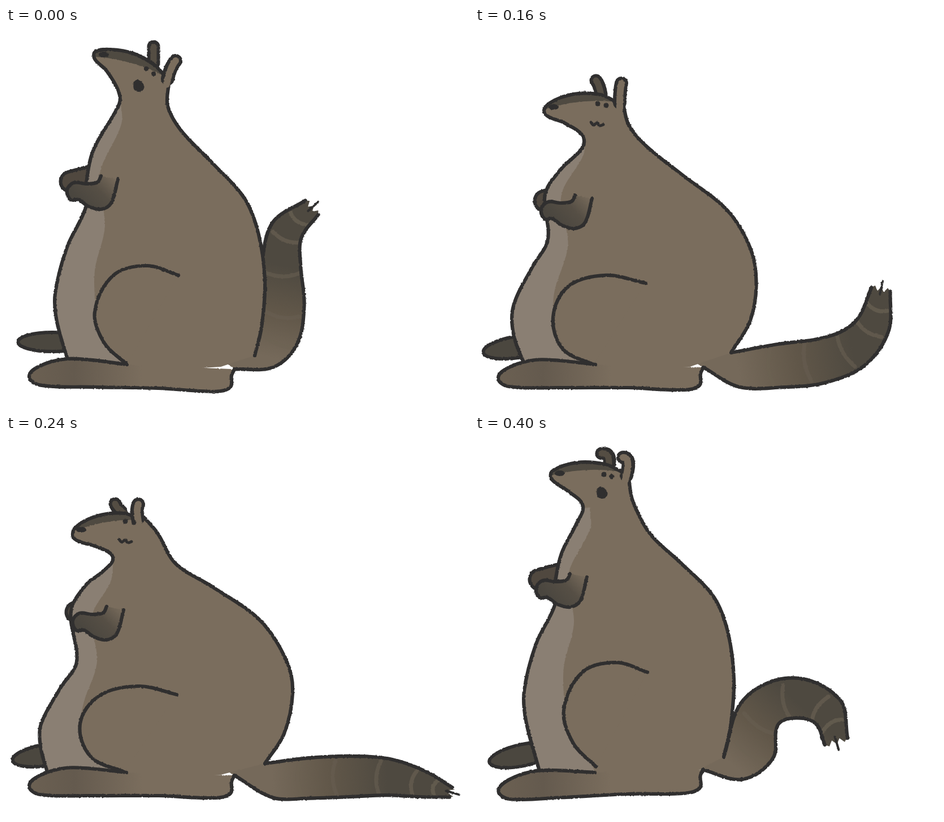
An HTML page for the animation above (0.48 s loop, 819 px wide and 673 px high).

```html
<!DOCTYPE html>
<html lang="en">
<head>
<meta charset="utf-8">
<title>Bouncing animal</title>
<style>
html, body { margin: 0; width: 100%; height: 100%; overflow: hidden; background: #fff; }
svg { display: block; width: 100vw; height: 100vh; }
path { stroke-linecap: round; stroke-linejoin: round; }
.ink { fill: none; stroke: #302f2f; stroke-width: 6.2; }
.stripe { fill: none; stroke: #6a6153; stroke-width: 7; }
.dark { fill: #302f2f; }
</style>
</head>
<body>
<svg id="stage" viewBox="0 0 819 673">
  <defs>
    <filter id="rough" filterUnits="userSpaceOnUse" x="0" y="0" width="819" height="673" color-interpolation-filters="sRGB">
      <feTurbulence type="fractalNoise" baseFrequency=".3" numOctaves="1" seed="4"/>
      <feDisplacementMap in="SourceGraphic" scale="3" xChannelSelector="R" yChannelSelector="G"/>
    </filter>
    <linearGradient id="arm" x1=".15" y1=".6" x2="1" y2=".05">
      <stop offset="0" stop-color="#4a463f"/><stop offset=".5" stop-color="#564f45"/><stop offset="1" stop-color="#7a6d5d"/>
    </linearGradient>
    <linearGradient id="foot">
      <stop offset="0" stop-color="#6b6052"/><stop offset=".22" stop-color="#645a4e"/><stop offset=".55" stop-color="#7a6d5d"/>
    </linearGradient>
  </defs>
</svg>
<script>
const FUR = '#7a6d5d', BELLY = '#8a7f73', SHADE = '#4b473f', INK = '#302f2f';
const STEP = 80;

const pts = s => s.split(' ').map(p => p.split(',').map(Number));
const mix = (a, b, t) => a.map((v, i) => v + (b[i] - v) * t);
const move = ([x, y], [nx, ny], d) => [x + nx * d, y + ny * d];
const unit = (a, b) => {
  const x = b[0] - a[0], y = b[1] - a[1], len = Math.hypot(x, y) || 1;
  return [x / len, y / len];
};

// Torso lines when tall, half squashed and fully squashed
const torso = {
  front: [
    '142,275 141,318 108,388 87,470 90,520 113,600',
    '134,280 134,345 105,402 76,475 78,535 106,602',
    '115,310 125,400 97,445 62,510 61,550 76,605'
  ].map(pts),
  back: [
    '310,182 365,239 422,302 447,366 458,450 452,530 440,580',
    '305,190 365,249 440,317 474,383 483,455 476,515 447,572',
    '300,226 365,267 450,327 497,400 507,455 492,527 458,580'
  ].map(pts),
  thigh: [
    '305,438 250,421 190,438 157,503 174,558 214,596',
    '302,445 233,431 170,452 147,512 163,567 211,597',
    '302,458 235,443 165,460 131,510 150,568 209,595'
  ].map(pts),
  patch: [
    '203,130 204,170 165,262 175,350 157,430 158,500',
    '195,155 201,185 155,275 169,365 145,460 148,515',
    '190,222 185,258 152,320 161,400 138,470 130,510'
  ].map(pts)
};
const armShape = pts('0,0 -6,11 -25,14 -48,12 -60,25 -54,42 -40,42 -22,54 0,59 18,48 30,6');
const footShape = pts('213,596 150,589 105,588 60,601 41,620 60,635 150,637 270,637 370,641 397,633 399,612 404,601');
const mouths = {
  open: { shape: pts('-6,-5 -1,-8 8,1 4,8 -5,6 -6,-5'), width: 5, fill: INK },
  dash: { shape: pts('-8,-1 0,1 8,1'), width: 10.5, fill: 'none' },
  curl: { shape: pts('-11,-3 -6,2 0,-2 4,3 11,1'), width: 5, fill: 'none' }
};

// squash: 0 tall to 1 low; lift: upward pull on the torso
const poses = [
  {
    squash: 0, lift: 0, footTilt: 1, farFoot: [82, 17, 0],
    head: '282,86 262,65 225,45 185,38 158,42 157,55 178,76 199,112 200,135 155,215', nape: '288,97 286,138',
    ear: '286,90 290,70 300,58', farEar: '261,62 261,45 261,33',
    nose: [173, 47, 9, 5], eyes: '248,72 261,81', eye: [4, 4], mouth: 'open', mouthAt: [234, 102], arm: [168, 262],
    tail: { line: '452,580 484,546 492,490 487,420 497,358 541,318', wide: 37, tip: 17, taper: 4, from: 3 }
  },
  {
    squash: .5, lift: 0, footTilt: 0, farFoot: [80, 17, -8],
    head: '266,102 250,84 205,67 160,68 140,85 150,108 181,129 189,152 168,190 147,221', nape: '281,108 288,145',
    ear: '275,105 278,85 286,67', farEar: '245,84 246,70 246,59',
    nose: [157, 95, 8, 13], eyes: '234,108 248,115', eye: [4.5, 8], mouth: 'dash', mouthAt: [225, 142], arm: [176, 280],
    tail: { line: '464,588 512,562 560,522 595,478 611,430 612,382', wide: 44, tip: 11, taper: 2, from: 1 }
  },
  {
    squash: .8, lift: 0, footTilt: 0, farFoot: [75, 19, -9],
    head: '250,131 222,118 175,117 132,133 123,151 158,168 190,190 190,212 152,250', nape: '262,134 272,172',
    ear: '256,132 256,110 259,98', farEar: '223,117 220,100 214,93',
    nose: [139, 140, 9, 5], eyes: '217,134 232,137', eye: [4.5, 4.5], mouth: 'curl', mouthAt: [216, 170], arm: [177, 296],
    tail: { line: '465,602 540,598 610,590 668,568 705,525 718,463', wide: 42, tip: 17, taper: 3, from: 1 }
  },
  {
    squash: 1, lift: 0, footTilt: 0, farFoot: [72, 19, -9],
    head: '238,149 210,137 160,142 122,163 121,182 160,196 189,215 170,241 143,262', nape: '243,143 268,172',
    ear: '233,146 230,130 234,121', farEar: '203,133 196,128 193,120',
    nose: [133, 166, 9, 5], eyes: '211,151 226,153', eye: [4.5, 4.5], mouth: 'curl', mouthAt: [211, 186], arm: [178, 302],
    tail: { line: '470,609 535,606 605,603 675,604 735,616 787,631', wide: 39, tip: 9, taper: 3, from: 1 }
  },
  {
    squash: .5, lift: 0, footTilt: 0, farFoot: [80, 17, -8],
    head: '250,100 220,87 175,84 125,100 122,122 155,138 185,158 178,182 147,223', nape: '273,112 286,145',
    ear: '255,112 260,104 263,103', farEar: '232,92 230,90 228,89',
    nose: [140, 111, 11, 5.5], eyes: '214,108 231,111', eye: [4, 4], mouth: 'dash', mouthAt: [219, 138], arm: [176, 275],
    tail: { line: '458,597 508,577 565,562 625,566 685,599 730,628', wide: 53, tip: 8, taper: 4, from: 1 }
  },
  {
    squash: 0, lift: 20, footTilt: -3, farFoot: [85, 19, -12],
    head: '261,64 230,50 180,47 137,62 136,77 168,100 191,124 178,158 153,208', nape: '272,76 279,115',
    ear: '268,70 277,38 262,38', farEar: '237,54 242,28 224,31',
    nose: [150, 66, 9, 5], eyes: '228,68 242,72', eye: [4.5, 4.5], mouth: 'open', mouthAt: [224, 100], arm: [168, 244],
    tail: { line: '455,582 495,553 505,490 562,464 623,487 639,541', wide: 40, tip: 21, taper: 3, from: 2 }
  }
];

// Smooth curve through the points; handles scale with each segment
function curve(p, start = 'M') {
  const tangent = i => unit(p[Math.max(i - 1, 0)], p[Math.min(i + 1, p.length - 1)]);
  let d = start + p[0];
  for (let i = 0; i < p.length - 1; i++) {
    const a = p[i], b = p[i + 1];
    const h = Math.hypot(b[0] - a[0], b[1] - a[1]) / 3;
    d += 'C' + [move(a, tangent(i), h), move(b, tangent(i + 1), -h), b];
  }
  return d;
}
const back = p => [...p].reverse();

// Parabola through the three torso states, then the lift
function torsoLine(keys, { squash: s, lift }) {
  const w = [2 * (s - .5) * (s - 1), 4 * s * (1 - s), 2 * s * (s - .5)];
  return keys[0].map((_, i) => {
    const [x, y] = [0, 1].map(k => w.reduce((sum, v, j) => sum + v * keys[j][i][k], 0));
    return [x, y - lift * Math.sin(Math.PI * (y - 100) / 600)];
  });
}

function turn(p, degrees, [cx, cy]) {
  const c = Math.cos(degrees * Math.PI / 180), s = Math.sin(degrees * Math.PI / 180);
  return p.map(([x, y]) => [cx + (x - cx) * c - (y - cy) * s, cy + (x - cx) * s + (y - cy) * c]);
}

const fill = (d, color) => `<path d="${d}" fill="${color}"/>`;
const ink = d => `<path class="ink" d="${d}"/>`;
const oval = ([x, y, rx, ry], attr = 'class="dark"') => `<ellipse cx="${x}" cy="${y}" rx="${rx}" ry="${ry}" ${attr}/>`;

// Rounded limb on a quadratic path, open at its root
function limb([root, bend, end], width, color) {
  const inner = move(root, unit(bend, root), 10);
  const line = (from, w, c) => `<path d="M${from}Q${bend},${end}" fill="none" stroke="${c}" stroke-width="${w}"/>`;
  return line(root, width + 6, INK) + line(inner, width - 6, color);
}

// Tail: a centre line thickened by a taper, with even bands and a tuft
function drawTail({ line, wide, tip, taper, from }, root, notch, id) {
  const c = pts(line), last = c.length - 1;
  const nodes = c.map((p, i) => {
    const u = i / last, [dx, dy] = unit(c[Math.max(i - 1, 0)], c[Math.min(i + 1, last)]);
    const half = (tip + (wide - tip) * (1 - u ** taper)) * (1 - .2 * (1 - u) ** 4);
    return { p, up: move(p, [dy, -dx], half), low: move(p, [-dy, dx], half) };
  });
  const top = [root, ...nodes.slice(from).map(n => n.up)];
  const low = [notch, ...nodes.map(n => n.low)];
  const end = nodes[last], dir = unit(c[last - 1], c[last]);
  const tuft = [1, 2, 3, 4, 5].map(k => move(mix(end.up, end.low, k / 6), dir, k % 2 ? 5 : -4));

  const bands = [.16, .34, .56, .76, .9].map(u => {
    const i = Math.floor(u * last), t = u * last - i;
    const [p, a, b] = ['p', 'up', 'low'].map(k => mix(nodes[i][k], nodes[i + 1][k], t));
    const bow = move(p, unit(c[i], c[i + 1]), -12);
    return `<path class="stripe" opacity="${.25 + u * .5}" d="M${mix(p, a, .85)}Q${bow},${mix(p, b, .85)}"/>`;
  }).join('');

  return `<linearGradient id="${id}" gradientUnits="userSpaceOnUse" x1="${c[0][0]}" y1="${c[0][1]}" x2="${c[3][0]}" y2="${c[3][1]}">
      <stop offset="0" stop-color="#75695a"/><stop offset=".5" stop-color="#615749"/><stop offset="1" stop-color="#4e4940"/>
    </linearGradient>`
    + fill(curve(top) + 'L' + tuft + curve(back(low), 'L') + 'L385,590Z', `url(#${id})`) + bands
    + ink(curve(top)) + ink(curve(low))
    + `<path class="ink" style="stroke-width:4" d="M${move(c[last], dir, -9)}L${move(c[last], dir, 15)}"/>`;
}

function drawFace(p) {
  const m = mouths[p.mouth];
  const shape = m.shape.map(q => move(q, p.mouthAt, 1));
  return oval(p.nose) + pts(p.eyes).map(e => oval([...e, ...p.eye])).join('')
    + `<path d="${curve(shape)}" fill="${m.fill}" stroke="${INK}" stroke-width="${m.width}"/>`;
}

function drawPose(p, n) {
  const [lowFront, lowBack, thigh, patch] = ['front', 'back', 'thigh', 'patch'].map(k => torsoLine(torso[k], p));
  const head = pts(p.head);
  const front = curve([...head, ...lowFront]);
  const spine = [...pts(p.nape), ...lowBack];
  const foot = turn(footShape, p.footTilt, [213, 615]);
  const body = front + 'L215,610L380,600' + curve(back(spine), 'L') + 'Z';

  const brow = [p.nose[0] - 16, p.nose[1] + 4], crown = head[0];
  const dip = move(mix(brow, crown, .5), [0, -1], 14);
  const mask = `M${brow}Q${dip},${crown}h6V0H${brow[0]}Z`;
  const belly = curve(patch) + `L215,600H0V${patch[0][1]}Z`;

  const arm = armShape.map(q => move(q, p.arm, 1));
  const [ax, ay] = p.arm, farArm = [[ax - 16, ay], [ax - 36, ay + 5], [ax - 54, ay + 10]];
  const [fx, fr, tilt] = p.farFoot, fy = tilt ? 565 : 556;

  return `<clipPath id="body${n}"><path d="${body}"/></clipPath>`
    + oval([fx, fy, 61, fr], `fill="${SHADE}" stroke="${INK}" stroke-width="6" transform="rotate(${tilt} ${fx} ${fy})"`)
    + limb(farArm, 35, '#50483f') + limb(pts(p.farEar), 17, '#544d43')
    + drawTail(p.tail, lowBack[lowBack.length - 1], foot[foot.length - 1], 'tail' + n)
    + fill(body, FUR)
    + `<g clip-path="url(#body${n})">${fill(belly, BELLY)}${fill(mask, '#4f4a41')}</g>`
    + ink(front) + ink(curve(spine))
    + fill(curve(thigh), FUR) + fill(curve(foot), 'url(#foot)')
    + ink(curve(foot)) + ink(curve(thigh))
    + limb(pts(p.ear), 18, FUR)
    + fill(curve(arm), 'url(#arm)') + ink(curve(arm))
    + drawFace(p);
}

const stage = document.getElementById('stage');
const groups = poses.map((p, n) => {
  const g = document.createElementNS('http://www.w3.org/2000/svg', 'g');
  g.setAttribute('filter', 'url(#rough)');
  g.innerHTML = drawPose(p, n);
  stage.append(g);
  return g;
});

let begin = null, shown = -1;
function render(t) {
  const now = Math.floor(t / STEP) % poses.length;
  if (now === shown) return;
  shown = now;
  groups.forEach((g, i) => g.style.display = i === now ? '' : 'none');
}
function tick(time) {
  begin ??= time;
  render(Math.max(0, time - begin));
  requestAnimationFrame(tick);
}
render(0);
requestAnimationFrame(tick);
</script>
</body>
</html>
```
